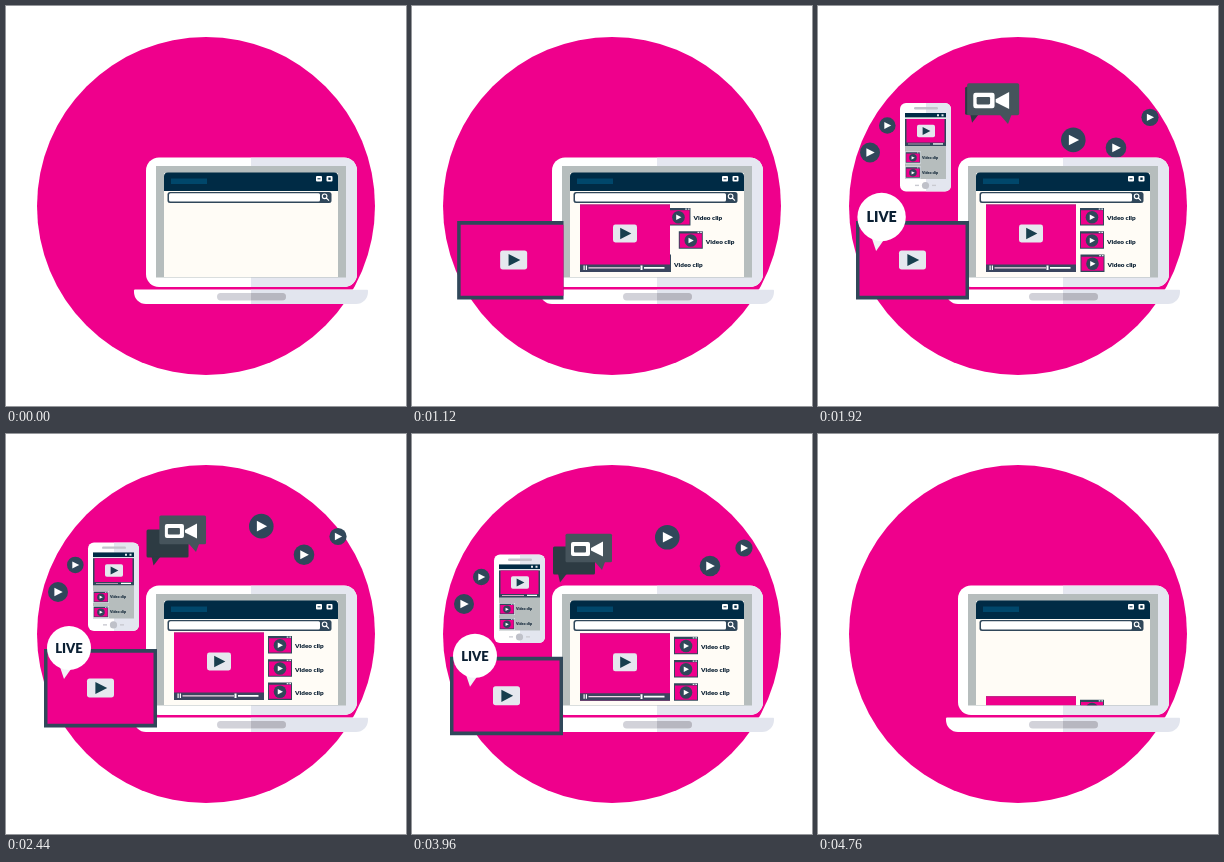
These frames come from a looping animation (400x400 px, 4.8 s). An HTML page with a canvas:

```html
<!DOCTYPE html>
<html lang="en">
<head>
<meta charset="utf-8">
<title>Video everywhere</title>
<style>
  html, body { margin: 0; width: 100%; height: 100%; overflow: hidden; background: #fff; }
  canvas { display: block; width: 400px; height: 400px; }
</style>
</head>
<body>
<canvas id="stage" width="400" height="400"></canvas>
<script>
const ctx = document.getElementById('stage').getContext('2d');
const LOOP = 4800, STEP = 40, EXIT = 3160, CUT = 4760;
const PINK = '#ef008c', NAVY = '#002b45', SLATE = '#30475a', PALE = '#e5e8ee', GREY = '#b6bdbd';

const clamp = v => Math.min(1, Math.max(0, v));
const part = (t, a, b) => clamp((t - a) / (b - a));
const mix = (a, b, p) => a + (b - a) * p;
const easeOut = p => 1 - Math.pow(1 - p, 2.2);
const easeInOut = p => (1 - Math.cos(Math.PI * p)) / 2;

// Runs past the resting value, then settles back on it.
function overshoot(t, start, peak, from, far, rest, settle = 540) {
  return t < peak
    ? mix(from, far, easeOut(part(t, start, peak)))
    : mix(far, rest, easeInOut(part(t, peak, peak + settle)));
}

// Accelerating drop; "at800" is the distance after 800 ms.
const fall = (t, at800, power, start = EXIT) =>
  at800 * Math.pow(Math.max(0, t - start) / 800, power);

function rect(x, y, w, h, fill, r = 0) {
  ctx.fillStyle = fill;
  ctx.beginPath();
  ctx.roundRect(x, y, w, h, r);
  ctx.fill();
}

function disc(x, y, r, fill) {
  ctx.fillStyle = fill;
  ctx.beginPath();
  ctx.arc(x, y, r, 0, Math.PI * 2);
  ctx.fill();
}

function poly(points, fill) {
  ctx.fillStyle = fill;
  ctx.beginPath();
  points.forEach(([x, y]) => ctx.lineTo(x, y));
  ctx.fill();
}

function label(text, x, y, size, align = 'left') {
  ctx.font = `900 ${size}px Lato, sans-serif`;
  ctx.textAlign = align;
  ctx.textBaseline = 'alphabetic';
  ctx.fillStyle = '#0b2033';
  ctx.fillText(text, x, y);
}

function group(x, y, scale, draw) {
  ctx.save();
  ctx.translate(x, y);
  ctx.scale(scale, scale);
  draw();
  ctx.restore();
}

function clipped(x, y, w, h, draw) {
  ctx.save();
  ctx.beginPath();
  ctx.rect(x, y, w, h);
  ctx.clip();
  draw();
  ctx.restore();
}

// Two-tone shape: white on the left of "split", shaded on the right.
function twoTone(x, y, w, h, r, split, left, right) {
  rect(x, y, w, h, left, r);
  clipped(split, y, x + w - split, h, () => rect(x, y, w, h, right, r));
}

function triangle(x, y, size, fill) {
  poly([[x - size * .42, y - size * .5], [x + size * .55, y], [x - size * .42, y + size * .5]], fill);
}

function playBadge(x, y, r) {
  disc(x, y, r, SLATE);
  triangle(x, y, r * .86, '#fff');
}

function playButton(x, y, w, h) {
  rect(x - w / 2, y - h / 2, w, h, PALE, w * .1);
  triangle(x, y, h * .64, '#173e4d');
}

function thumb(w, h) {
  rect(0, 0, w, h, SLATE);
  rect(w * .04, h * .13, w * .92, h * .81, PINK);
  rect(w * .78, h * .03, w * .07, h * .07, PALE);
  rect(w * .89, h * .03, w * .07, h * .07, PALE);
  playBadge(w * .5, h * .53, h * .36);
}

function drawLaptop() {
  twoTone(140, 151.5, 211, 129.5, 13, 245, '#fff', '#e5e7f0');
  rect(150, 160, 190, 111.5, GREY);
  rect(158, 167, 174, 104, '#fffcf6');
  rect(158, 166.5, 174, 18.5, NAVY, [4, 4, 0, 0]);
  rect(165, 172.5, 36, 5.5, '#00476b');
  for (const x of [310, 320.5]) rect(x, 170, 6, 5.5, '#fff', 1);
  rect(311.5, 172.3, 3, 1, NAVY);
  rect(322.3, 171.5, 2.4, 2.4, NAVY);

  rect(161.5, 186, 164, 11, SLATE, 2.5);
  rect(163, 187.2, 151, 8.4, '#fff', 1.5);
  ctx.strokeStyle = '#fff';
  ctx.lineWidth = 1.1;
  ctx.beginPath();
  ctx.arc(318.6, 190.3, 2.3, 0, Math.PI * 2);
  ctx.moveTo(320.3, 192);
  ctx.lineTo(323, 194.7);
  ctx.stroke();

  twoTone(128, 283.5, 234, 14.5, [1, 1, 12, 12], 245, '#fff', '#e2e5ee');
  twoTone(211, 287, 69, 7.5, 3.7, 245, '#d2d2d9', '#b7b7c0');
}

function drawVideo(t) {
  const scale = overshoot(t, 0, 300, 0, 1.11, 1, 260);
  if (scale <= 0) return;
  group(213, 232.5, scale, () => {
    rect(-45, -34, 90, 67.5, PINK);
    rect(-45, -34, 90, 1, '#b3207f');
    rect(-45, 26, 90, 7.5, '#3b465f');
    playButton(0, -5, 24, 18);
  });
  if (t < 600) return;
  const drop = (delay, far) => far * (1 - easeOut(part(t, 600 + delay, 820 + delay)));
  const pauseY = 259.5 - drop(60, 16);
  rect(171.5, pauseY, 1.2, 4.4, '#fff');
  rect(173.8, pauseY, 1.2, 4.4, '#fff');
  rect(232, 261 - drop(40, 16), 20.5, 1.8, '#fff');
  rect(228.5, 259.5 - drop(0, 5), 2, 4.6, '#fff');
  rect(176.5, 261.3, 51.5 * easeInOut(part(t, 720, 1100)), 1.2, '#f3d5e6');
}

function drawClips(t) {
  const timing = [[860, 1360], [700, 1200], [980, 1480]];
  timing.forEach(([start, peak], i) => {
    if (t < start) return;
    const dx = overshoot(t, start, peak, -62, 6, 0);
    group(262 + dx, 202 + 23.2 * i, 1, () => {
      thumb(24, 17.5);
      label('Video clip', 27, 12.3, 6.4);
    });
  });
}

function drawScreen(t) {
  clipped(158, 167, 174, 104.3, () =>
    group(0, fall(t, 12.6, 4, 3560), 1, () => {
      drawClips(t);
      drawVideo(t);
    }));
}

function drawPhone() {
  twoTone(0, 0, 51, 88.5, 6, 26, '#fff', '#e3e6ef');
  rect(14, 4, 24, 2.4, '#c3c4cc', 1.2);
  rect(5, 10, 41, 66, GREY);
  rect(5, 10, 41, 4.5, NAVY);
  rect(37, 11.3, 2, 2, PALE);
  rect(41.5, 11.3, 2, 2, PALE);
  rect(5, 14.5, 41, 1.4, '#dfe5e8');
  rect(5, 15.9, 41, 27, SLATE);
  rect(6.5, 15.9, 38, 23.6, PINK);
  playButton(26, 28, 18, 12.5);
  rect(8, 40.6, 22, .8, '#d6a8c4');
  rect(33, 40.3, 10, 1.3, '#fff');
  for (const y of [48.5, 63.5]) {
    rect(5, y, 16, 12, '#dfe5e8');
    group(5.7, y + .7, 1, () => thumb(14.5, 10.5));
    label('Video clip', 22, y + 7.4, 3.6);
  }
  disc(25.5, 82.5, 3.6, '#bfc1c9');
  rect(15, 81.7, 4, 1.4, '#c9cad1');
  rect(32, 81.7, 4, 1.4, '#c9cad1');
}

function drawTv() {
  rect(0, 0, 113, 78.5, SLATE);
  rect(3.5, 3.8, 106, 71, PINK);
  playButton(56.5, 39, 27, 19);
}

// Origin sits at the tip of the tail.
function drawLive() {
  poly([[-4, -14], [1, 1], [8, -9]], '#f1f3f6');
  disc(6, -30, 22, '#fff');
  label('LIVE', 6, -25.3, 13, 'center');
}

function drawPhoneSide(t, tvY) {
  if (t < 1320) return;
  const y = overshoot(t, 1320, 1920, 215, 97, 108.5) + fall(t, 12, 4.1);
  clipped(0, 0, 140, tvY + 77, () => {
    group(82, y, 1, drawPhone);
    playBadge(69.3, y + 22.5, 8.3);
    playBadge(52, y + 49.5, 10);
  });
}

function drawTvSide(t, tvY) {
  if (t < 700) return;
  const x = overshoot(t, 700, 1380, 152, 30.5, 38);
  clipped(0, 0, 151.5, 400, () => {
    group(x, tvY, 1, drawTv);
    if (t < 1440) return;
    const scale = overshoot(t, 1440, 1920, 0, 1.1, 1);
    group(x + 19, tvY + 29, scale, drawLive);
  });
}

function drawBubbles(t) {
  const dy = fall(t, 18, 3);
  if (t >= 1880) {
    const away = overshoot(t, 1880, 2260, 1, -.1, 0, 400);
    group(141 + 8 * away, 94.5 - 18 * away + dy, 1, () => {
      rect(0, 0, 42, 28, '#2d3b43', 1.5);
      poly([[5, 27], [7, 36], [14, 27]], '#2d3b43');
    });
  }
  if (t < 1620) return;
  group(190, 118 + dy, overshoot(t, 1620, 1960, 0, 1.13, 1), () => {
    rect(-36.5, -36.3, 46.5, 28.5, '#46545c', 1.5);
    poly([[-7, -8], [0, 0], [3, -8]], '#46545c');
    rect(-31, -28, 19, 14, '#fff', 2);
    rect(-28, -24, 12, 6.5, '#46545c', 1);
    poly([[-11, -22], [1, -28.5], [1, -13.5], [-11, -19.5]], '#fff');
  });
}

function drawFloaters(t) {
  const floaters = [
    { x: 255.3, r: 12.3, start: 1770, peak: 2380, far: 92, rest: 97.3, drop: 6 },
    { x: 298, r: 10.3, start: 1770, peak: 2260, far: 119, rest: 126, drop: 6 },
    { x: 332, r: 8.6, start: 1560, peak: 2200, far: 100, rest: 106, drop: 8 }
  ];
  for (const f of floaters) {
    if (t < f.start) continue;
    const y = overshoot(t, f.start, f.peak, 170, f.far, f.rest);
    playBadge(f.x, y + fall(t, f.drop, 4), f.r);
  }
}

function render(t) {
  ctx.clearRect(0, 0, 400, 400);
  disc(200, 200, 169, PINK);
  const present = t < CUT;
  const tvY = 215 + fall(t, 7.8, 3.65);
  if (present) {
    drawFloaters(t);
    drawBubbles(t);
  }
  drawLaptop();
  drawScreen(t);
  if (present) {
    drawPhoneSide(t, tvY);
    drawTvSide(t, tvY);
  }
}

const origin = performance.now();
function tick() {
  const elapsed = (performance.now() - origin) % LOOP;
  render(Math.floor(elapsed / STEP) * STEP);
  requestAnimationFrame(tick);
}
tick();
</script>
</body>
</html>
```
